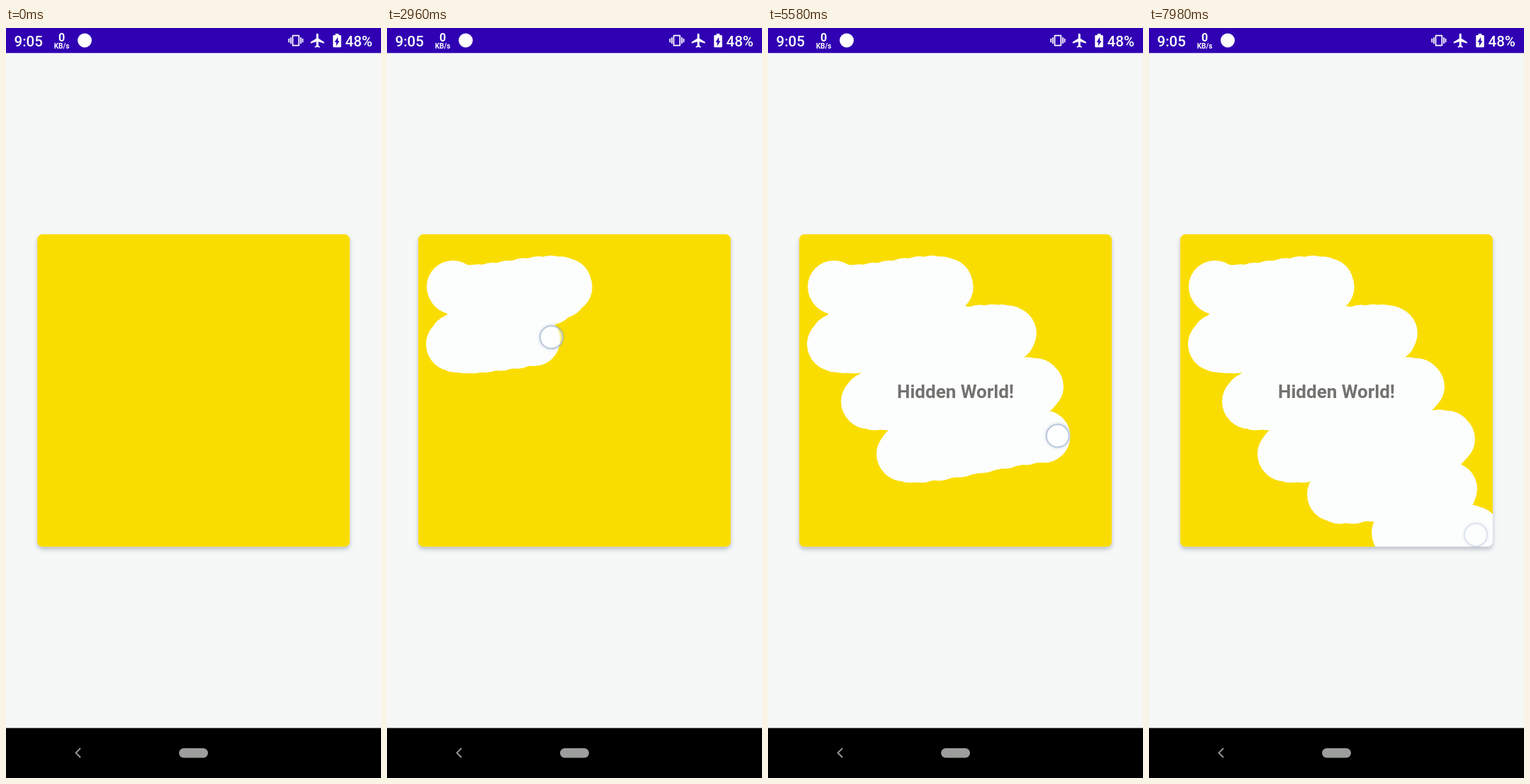
Recreate the animation shown at these times as an HTML page. Size 529 by 1058 pixels, loop 8000 ms.

```html
<!DOCTYPE html>
<html lang="en">
<head>
<meta charset="utf-8">
<title>Scratch card</title>
<style>
  html, body { margin: 0; width: 100%; height: 100%; overflow: hidden; background: #f6f8f8; }
  svg { display: block; width: 100vw; height: 100vh; }
  text { font-family: Roboto, sans-serif; }
</style>
</head>
<body>
<svg viewBox="0 0 529 1058">
  <defs>
    <rect id="card" x="44.1" y="291" width="440.8" height="440.8" rx="7.3"/>
    <filter id="soft" x="-10%" y="-10%" width="120%" height="120%"><feGaussianBlur stdDeviation="3.4"/></filter>
    <filter id="glow" x="-50%" y="-50%" width="200%" height="200%"><feGaussianBlur stdDeviation="1.6"/></filter>
    <mask id="cover" maskUnits="userSpaceOnUse" x="0" y="0" width="529" height="1058">
      <rect width="529" height="1058" fill="#fff"/>
      <g fill="none" stroke="#000" stroke-linecap="round" stroke-linejoin="round">
        <path id="trail" stroke-width="71"/>
        <path id="dots" stroke-width="74"/>
      </g>
    </mask>
  </defs>

  <rect width="529" height="1058" fill="#f6f8f8"/>
  <rect width="529" height="35.3" fill="#3000b3"/>

  <g fill="#fff">
    <text x="11.5" y="25.5" font-size="20.5" font-weight="500">9:05</text>
    <text x="78.5" y="19" font-size="16" font-weight="700" text-anchor="middle">0</text>
    <text x="78.5" y="28.5" font-size="10" font-weight="700" text-anchor="middle">KB/s</text>
    <circle cx="111" cy="17.5" r="10"/>
    <path transform="translate(398.3 7) scale(.88)" d="M0 15h2V9H0v6zm3 2h2V7H3v10zm19-8v6h2V9h-2zm-3 8h2V7h-2v10zM16.5 3h-9C6.67 3 6 3.67 6 4.5v15c0 .83.67 1.5 1.5 1.5h9c.83 0 1.5-.67 1.5-1.5v-15c0-.83-.67-1.5-1.5-1.5zM16 19H8V5h8v14z"/>
    <path transform="translate(427.7 5.7)" d="M21 16v-2l-8-5V3.5c0-.83-.67-1.5-1.5-1.5S10 2.67 10 3.5V9l-8 5v2l8-2.5V19l-2 1.5V22l3.5-1 3.5 1v-1.5L13 19v-5.5l8 2.5z"/>
    <path transform="translate(453.2 6) scale(1.15 .97)" d="M15.67 4H14V2h-4v2H8.33C7.6 4 7 4.6 7 5.33v15.33C7 21.4 7.6 22 8.33 22h7.33c.74 0 1.34-.6 1.34-1.33V5.33C17 4.6 16.4 4 15.67 4zM11 20v-5.5H9L13 7v5.5h2L11 20z"/>
    <text x="478.5" y="25.5" font-size="20.5" font-weight="500">48%</text>
  </g>

  <use href="#card" y="3.5" fill="#646c84" opacity=".42" filter="url(#soft)"/>
  <use href="#card" fill="#fcfdfd"/>
  <text x="264.5" y="522" font-size="26" font-weight="700" fill="#72726f" text-anchor="middle">Hidden World!</text>
  <g mask="url(#cover)"><use href="#card" fill="#fadd00"/></g>

  <g id="finger">
    <circle r="17" fill="none" stroke="#6e82a8" stroke-opacity=".25" stroke-width="2" filter="url(#glow)"/>
    <circle r="16" fill="#fff" fill-opacity=".55" stroke="#a9bad4" stroke-opacity=".75" stroke-width="2"/>
  </g>

  <rect y="987.5" width="529" height="70.5"/>
  <path d="M105 1016l-6.5 6.5 6.5 6.5" fill="none" stroke="#9a9c9a" stroke-width="1.8"/>
  <rect x="244" y="1016" width="41" height="13.5" rx="6.75" fill="#9c9e9c"/>
</svg>
<script>
  const LOOP = 8000, START = 1300, STEADY = 1380;
  const REST = 1.5;  // steps the finger waits at each left turn
  const BEND = 6;    // how far a stroke curves off its straight line
  const FADE_FROM = 140;

  // Turning points of the zigzag, left and right in turn
  const turns = [
    { step: 4, x: 93, y: 365 },      { step: 16.7, x: 253, y: 364 },
    { step: 26, x: 92, y: 446 },     { step: 43.3, x: 342, y: 431 },
    { step: 55, x: 140, y: 527 },    { step: 67.8, x: 380, y: 505 },
    { step: 80, x: 190, y: 601 },    { step: 92.8, x: 423, y: 579 },
    { step: 103.3, x: 260, y: 658 }, { step: 113, x: 426, y: 650 },
    { step: 125, x: 351, y: 712 },   { step: 137, x: 461, y: 715 }
  ];
  const first = turns[0].step;

  function pointAt(step) {
    const i = turns.findLastIndex((t, k) => t.step <= step && k < turns.length - 1);
    const a = turns[i], b = turns[i + 1];
    const leave = a.step + (i % 2 ? 0 : REST);
    const u = Math.min(1, Math.max(0, (step - leave) / (b.step - leave)));
    const ease = (1 - Math.cos(Math.PI * u)) / 2;
    return {
      x: a.x + (b.x - a.x) * ease,
      y: a.y + (b.y - a.y) * ease + BEND * Math.sin(2 * Math.PI * u)
    };
  }

  // Steps come in threes lasting 20, 20 and 100 ms.
  function stepAt(t) {
    if (t < STEADY) return t < START ? -1 : 0;
    const r = (t - STEADY) % 140;
    return 1 + 3 * Math.floor((t - STEADY) / 140) + (r < 20 ? 0 : r < 40 ? 1 : 2);
  }

  const [trail, dots, finger] = ['trail', 'dots', 'finger'].map(id => document.getElementById(id));
  const xy = p => `${p.x.toFixed(1)} ${p.y.toFixed(1)}`;
  let shown = null;

  // The scratched trail follows one step behind the finger.
  function draw(step) {
    const done = [];
    for (let s = first; s < step; s++) done.push(xy(pointAt(s)));
    trail.setAttribute('d', done.length ? 'M' + done.join('L') : '');
    dots.setAttribute('d', done.map(p => `M${p}h.01`).join(''));
    finger.setAttribute('opacity', step < first ? 0 : Math.min(1, 1 - (step - FADE_FROM) * 0.17));
    if (step >= first) finger.setAttribute('transform', `translate(${xy(pointAt(step))})`);
  }

  const origin = performance.now();
  function tick() {
    const step = stepAt((performance.now() - origin) % LOOP);
    if (step !== shown) draw(shown = step);
    requestAnimationFrame(tick);
  }
  tick();
</script>
</body>
</html>
```
